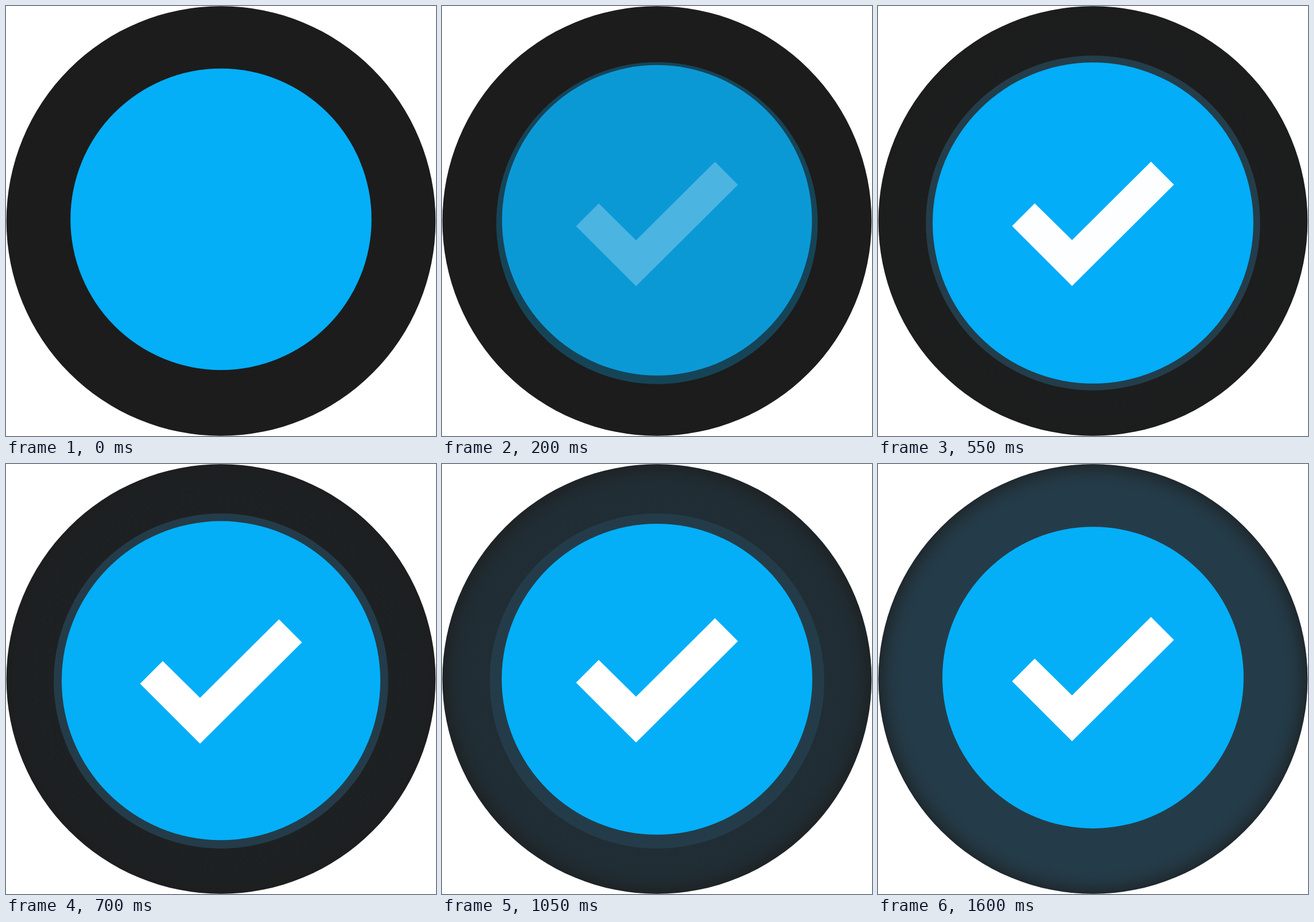
An HTML page with a canvas for the animation above (1.65 s loop, 749 px wide and 748 px high).

```html
<!DOCTYPE html>
<html lang="en">
<head>
<meta charset="utf-8">
<title>Check</title>
<style>
  html, body { margin: 0; width: 100%; height: 100%; overflow: hidden; background: #fff; }
  canvas { display: block; }
</style>
</head>
<body>
<canvas id="stage" width="749" height="748"></canvas>
<script>
const ctx = document.getElementById('stage').getContext('2d');
const LOOP = 1650, STEP = 50, CX = 374.5;
const DARK = 'rgb(28,28,28)';
const BLUE = [4, 175, 248], SLATE = [36, 60, 73];
const TICK = [[233.5, 383], [273, 343.5], [338, 407.5], [475.5, 271], [515.5, 311], [338, 487.3]];

const mix = (a, b, p) => a + (b - a) * p;
const rgb = (c, alpha = 1) => `rgba(${c.map(Math.round)},${alpha})`;

// Sine ease-in-out between two times
function ease(t, from, to) {
  const x = Math.min(1, Math.max(0, (t - from) / (to - from)));
  return 0.5 - 0.5 * Math.cos(Math.PI * x);
}

function disc(y, r, fill, alpha = 1) {
  ctx.globalAlpha = alpha;
  ctx.fillStyle = fill;
  ctx.beginPath();
  ctx.arc(CX, y, r, 0, 2 * Math.PI);
  ctx.fill();
  ctx.globalAlpha = 1;
}

// Slate light with a soft falloff at the rim
const glow = ctx.createRadialGradient(CX, 374, 325, CX, 374, 374);
for (const [stop, alpha] of [[0, 1], [0.35, 0.95], [0.6, 0.82], [0.8, 0.62], [1, 0.38]]) {
  glow.addColorStop(stop, rgb(SLATE, alpha));
}

function tick(dy, alpha) {
  ctx.fillStyle = `rgba(255,255,255,${alpha})`;
  ctx.beginPath();
  for (const [x, y] of TICK) ctx.lineTo(x, y + dy);
  ctx.fill();
}

function draw(t) {
  const appear = ease(t, 0, 580);
  const settle = ease(t, 395, 1645);
  const ringColor = BLUE.map((v, i) => mix(v, SLATE[i], appear));

  ctx.fillStyle = '#fff';
  ctx.fillRect(0, 0, 749, 748);
  disc(374, 373.8, DARK);
  disc(374, 373.8, glow, settle);
  disc(mix(371, 377.5, appear), mix(262.2, 291.4, appear), rgb(ringColor));
  disc(mix(377.7, 371.5, settle), mix(280, 262.3, settle), rgb(BLUE), appear);
  tick(-5 * settle, appear);
}

function frame(now) {
  draw(Math.floor((now % LOOP) / STEP) * STEP);
  requestAnimationFrame(frame);
}
draw(0);
requestAnimationFrame(frame);
</script>
</body>
</html>
```
